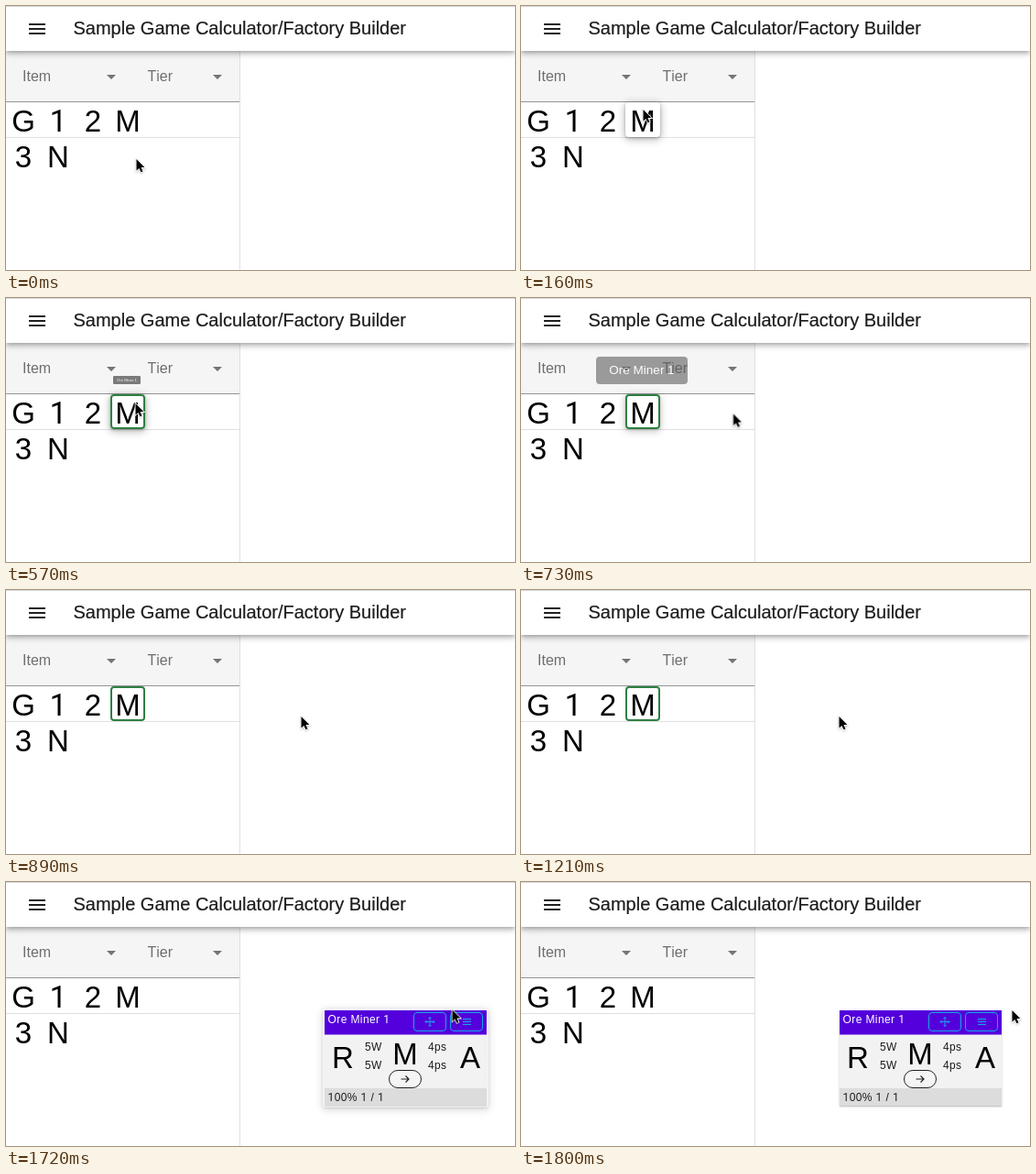
Write an HTML page that moves like this. It is 556 px wide and 288 px high and loops after 1880 ms.

```html
<!DOCTYPE html>
<html lang="en">
<head>
<meta charset="utf-8">
<title>Factory Builder</title>
<style>
  html, body { margin: 0; width: 100%; height: 100%; overflow: hidden; background: #fff; }
  #stage { position: absolute; left: 0; top: 0; width: 556px; height: 288px; overflow: hidden; }
  #stage div, #stage svg { position: absolute; }
  svg { left: 0; top: 0; width: 556px; height: 288px; overflow: visible; }
  text { font-family: "Liberation Sans", Arial, sans-serif; font-kerning: none; }
  .one { font-family: Roboto, sans-serif; }
  .big { font-size: 33px; text-anchor: middle; }
  .title { font-size: 20px; fill: #1c1c1c; stroke: #1c1c1c; stroke-width: .2px; }
  .label { font-size: 16px; fill: #6e6e6e; }
  .small { font-size: 12px; letter-spacing: .4px; fill: #1c1c1c; }
  .end { text-anchor: end; }
  #filters { left: 0; top: 49px; width: 255px; height: 55px; background: #f5f5f5; border-bottom: 1px solid #949494; }
  #bar { left: 0; top: 0; width: 556px; height: 49px; background: #fff;
    box-shadow: 0 2px 4px -1px rgba(0,0,0,.2), 0 4px 5px rgba(0,0,0,.14), 0 1px 10px rgba(0,0,0,.12); }
  #rowLine { left: 0; top: 143px; width: 255px; height: 1px; background: #e0e0e0; }
  #sideLine { left: 255px; top: 49px; width: 1px; height: 239px; background: #e0e0e0; }
  .tile { left: 114px; top: 105px; width: 38px; height: 38px; border-radius: 4px; box-sizing: border-box; }
  .raised { box-shadow: 0 1px 3px rgba(0,0,0,.24), 0 2px 9px 1px rgba(0,0,0,.26); }
  #hover { background: #fff; }
  #selected { border: 2px solid #2e8043; }
  #tooltip { left: 82px; top: 64px; width: 100px; height: 30px; border-radius: 4px;
    background: rgba(97,97,97,.92); transform-origin: 50% 100%; color: #fff; text-align: center;
    font: 13.5px/30px "Liberation Sans", Arial, sans-serif; }
  #card { left: 0; top: 0; }
  #rest { left: 348px; top: 140px; width: 177px; height: 104px;
    box-shadow: 0 1px 1px rgba(0,0,0,.14), 0 1px 3px rgba(0,0,0,.14); }
  #lift { left: 346px; top: 138px; width: 181px; height: 108px; border-radius: 3px; background: #f2f2f2; }
  #cursor { filter: drop-shadow(0 1px 1px rgba(0,0,0,.25)); }
</style>
</head>
<body>
<div id="stage">
  <div id="filters"></div>
  <div id="rowLine"></div>
  <div id="sideLine"></div>
  <div id="bar"></div>
  <div id="hover" class="tile raised"></div>
  <div id="selected" class="tile"></div>

  <svg viewBox="0 0 556 288">
    <path d="M0 .5H556" stroke="#d8d8d8"/>
    <path d="M25 20h18M25 25h18M25 30h18" stroke="#202020" stroke-width="2"/>
    <text class="title" x="73.5" y="31">Sample Game Calculator/Factory Builder</text>
    <text class="label" x="18" y="82">Item</text>
    <text class="label" x="154.5" y="82">Tier</text>
    <path d="M110 75h10l-5 5zM226 75h10l-5 5z" fill="#757575"/>
    <g id="palette" class="big"></g>
  </svg>

  <div id="tooltip">Ore Miner 1</div>

  <div id="card">
    <div id="rest"></div>
    <div id="lift" class="raised"></div>
    <svg viewBox="0 0 556 288">
      <path d="M348 140h177v104h-177z" fill="#f2f2f2"/>
      <path d="M348 140h177v26.5h-177z" fill="#5300dc"/>
      <path d="M348 225h177v19h-177z" fill="#dcdcdc"/>
      <text class="small" x="351.5" y="154" style="fill:#fff">Ore Miner <tspan class="one">1</tspan></text>
      <g fill="none" stroke="#14a6e6">
        <rect x="445.5" y="142.5" width="35" height="20" rx="3.5"/>
        <rect x="485.5" y="142.5" width="35" height="20" rx="3.5"/>
        <path d="M458 152.5h10M463 147.5v10M459.5 151l-1.5 1.5 1.5 1.5M466.5 151l1.5 1.5-1.5 1.5M461.5 149l1.5-1.5 1.5 1.5M461.5 156l1.5 1.5 1.5-1.5"/>
        <path d="M499 149.5h9M499 152.5h9M499 155.5h9"/>
      </g>
      <g class="big">
        <text x="368" y="203">R</text><text x="436" y="199">M</text><text x="507" y="203">A</text>
      </g>
      <text class="small" x="392" y="204">5W</text>
      <text class="small end" x="481.5" y="204">4ps</text>
      <rect x="418.5" y="205.5" width="35" height="19" rx="9.5" fill="#f5f5f5" stroke="#222"/>
      <path d="M431.5 215h8.5M436.5 211.5l3.5 3.5-3.5 3.5" fill="none" stroke="#222" stroke-width="1.2"/>
      <g id="pending">
        <text class="small" x="392" y="184">?</text>
        <text class="small end" x="481.5" y="184">?</text>
        <text class="small one" x="351.5" y="239">1</text>
      </g>
      <g id="computed">
        <text class="small" x="392" y="184">5W</text>
        <text class="small end" x="481.5" y="184">4ps</text>
        <text class="small" x="351.5" y="239"><tspan class="one">1</tspan>00% <tspan class="one">1</tspan> / <tspan class="one">1</tspan></text>
      </g>
    </svg>
  </div>

  <svg id="cursor" viewBox="0 0 556 288">
    <path d="M.5 0V12.5l2.900-2.600 2.100 4.400 2-.9-2-4.300h3.900z" fill="#000" stroke="#fff" paint-order="stroke" stroke-width="1.600"/>
  </svg>
</div>
<script>
  const LOOP = 1880, TICK = 80;

  ["G12M", "3N"].forEach((row, r) => [...row].forEach((letter, c) => {
    const text = document.createElementNS("http://www.w3.org/2000/svg", "text");
    text.setAttribute("x", 19 + 38 * c);
    text.setAttribute("y", 137 + 39 * r);
    text.textContent = letter;
    if (letter === "1") text.classList.add("one");
    document.getElementById("palette").append(text);
  }));

  function play(id, prop, steps) {
    const frames = steps.map(([time, value]) =>
      ({ offset: time / LOOP, [prop]: value, easing: "steps(1, end)" }));
    frames.push({ ...frames.at(-1), offset: 1 });
    document.getElementById(id).animate(frames, { duration: LOOP, iterations: Infinity });
  }

  const smooth = p => p * p * (3 - 2 * p);

  // Eases through moves of [start, end, target], redrawn once per tick.
  function glide(id, prop, format, value, ...moves) {
    const steps = [[0, format(value)]];
    for (const [start, end, target] of moves) {
      for (let t = start + TICK; t <= end; t += TICK) {
        const p = smooth((t - start) / (end - start));
        steps.push([t, format(value.map((v, i) => v + (target[i] - v) * p))]);
      }
      value = target;
    }
    play(id, prop, steps);
  }

  const show = (id, from, to = LOOP) => play(id, "opacity",
    [[0, from ? 0 : 1], [from, 1], [to, to < LOOP ? 0 : 1]].filter(([t], i) => i !== 1 || t));
  const fade = (id, value, ...moves) => glide(id, "opacity", ([o]) => o, [value], ...moves);

  glide("cursor", "transform", ([x, y]) => `translate(${x}px, ${y}px)`, [142, 167],
    [0, 160, [133, 113]], [240, 320, [132, 112]], [490, 570, [141, 115]],
    [570, 890, [322, 138]], [890, 1050, [327, 138]], [1050, 1210, [347, 138]],
    [1560, 1800, [536, 140]]);

  fade("hover", 0, [0, 160, [1]], [650, 890, [0]]);
  fade("tooltip", 0, [490, 570, [.9]], [650, 890, [0]]);
  glide("tooltip", "transform", ([s]) => `scale(${s})`, [.3], [570, 730, [1]]);
  fade("lift", 1, [1640, 1800, [0]]);
  show("selected", 570, 1470);
  show("card", 1470);
  show("pending", 0, 1640);
  show("computed", 1640);
</script>
</body>
</html>
```
